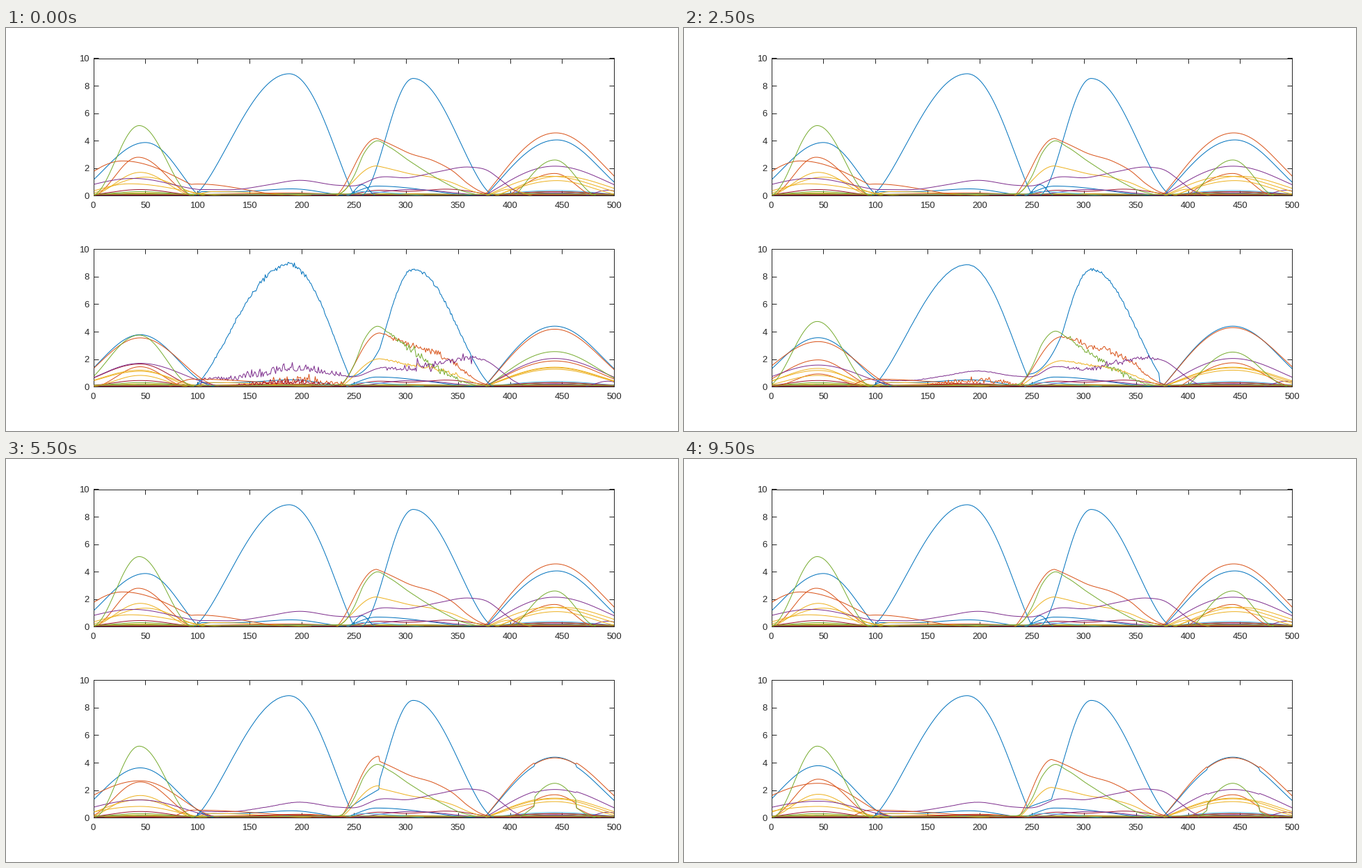
A matplotlib script that plays this animation: 966x580 px, repeating every 10000 ms.

```python
import numpy as np
import matplotlib.pyplot as plt
from matplotlib.animation import FuncAnimation

WIDTH, HEIGHT, DPI = 966, 580, 100
PX = 72 / DPI
FRAMES, INTERVAL = 20, 500
INK = "#262626"
BLUE, ORANGE, YELLOW, PURPLE, GREEN, CYAN, MAROON = COLORS = (
    "#0072bd", "#d95319", "#edb120", "#7e2f8e", "#77ac30", "#4dbeee", "#a2142f")
plt.rcParams["font.family"] = "Liberation Sans"

X = np.arange(1, 501.0)


def ease(t):
    t = np.clip(t, 0, 1)
    return t * t * (3 - 2 * t)


def pulse(value, center, width):
    return np.exp(-((value - center) / width) ** 2)


def bell(center, height, left, right, left_power=2.0, right_power=2.0):
    """Lopsided cosine hump, zero beyond its half-widths."""
    d = X - center
    u = np.clip(np.abs(d) / np.where(d < 0, left, right), 0, 1)
    return height * np.cos(u * np.pi / 2) ** np.where(d < 0, left_power, right_power)


def late_bell(height, right=90, left=68, center=443):
    return bell(center, height, left, right, 1.1)


def through(*points):
    """Cubic Hermite curve through the points, zero outside them."""
    xs, ys = np.array(points, float).T
    m = np.gradient(ys, xs)
    i = np.clip(np.searchsorted(xs, X, "right") - 1, 0, len(xs) - 2)
    h = xs[i + 1] - xs[i]
    t = (X - xs[i]) / h
    y = (ys[i] + (ys[i + 1] - ys[i]) * ease(t)
         + t * (1 - t) * h * ((1 - t) * m[i] - t * m[i + 1]))
    return np.where((X < xs[0]) | (X > xs[-1]), 0, y)


def noise(frame, seed, start, end, level):
    """Jitter that fades in and out over a span."""
    span = np.clip((X - start) / (end - start), 0, 1)
    rng = np.random.default_rng(100 * seed + frame)
    return level * np.sin(np.pi * span) ** 0.6 * rng.normal(size=X.size)


FIRST_PEAK = bell(188, 8.87, 92, 63, 1.4, 1.2)
SECOND_PEAK = bell(307, 8.53, 50, 78, 1.8, 1.6)
ORANGE_FALL = through((262, 4.35), (272, 4.17), (285, 3.75), (303, 3.1), (328, 2.5),
                      (345, 1.8), (360, .85), (372, .3), (380, .12))
GREEN_HUMP = through((230, .1), (240, .3), (250, 1.4), (260, 3.1), (271, 3.97), (284, 3.55),
                     (303, 2.55), (335, 1.05), (352, .4), (367, .1))
PURPLE_WAVE = through((104, .45), (140, .47), (165, .75), (197, 1.12), (235, .76), (253, .75),
                      (273, 1.32), (303, 1.32), (330, 1.73), (362, 2.08), (378, 1.85),
                      (392, 1.1), (403, .45), (412, .1))


def small_curves():
    rng = np.random.default_rng(7)
    curves = []
    for i in range(14):
        a, b, c, d = rng.uniform(0, 1, 4) ** 2
        curves.append((COLORS[i % 7], 0.04 + 0.06 * a + bell(45, 0.2 * a, 50, 55)
                       + bell(190, 0.08 * b, 80, 60) + bell(290, 0.15 * c, 45, 80)
                       + bell(443, 0.2 * d, 60, 55)))
    return curves + [
        (MAROON, bell(45, .45, 62, 62)),
        (CYAN, late_bell(.38)),
        (MAROON, late_bell(.3)),
        (BLUE, .3 * bell(105, 1, 10, 70) + bell(190, .5, 80, 60)),
        (YELLOW, bell(115, .3, 25, 110)),
        (ORANGE, .1 + bell(190, .1, 90, 60)),
        (BLUE, bell(272, .7, 36, 105)),
        (MAROON, bell(275, .4, 40, 60) + bell(338, .48, 50, 60)),
        (PURPLE, bell(305, .45, 65, 80)),
        (CYAN, bell(258, .3, 18, 70)),
        (PURPLE, bell(494, .4, 25, 25)),
    ]


SMALL = small_curves()


def still_scene():
    orange_left = np.maximum(bell(28, 2.53, 75, 98, 2, 1.6), bell(100, .85, 60, 95))
    orange_mid = np.where(X < 272, bell(272, 4.17, 40, 40, 1.6), ORANGE_FALL)
    return SMALL + [
        (BLUE, bell(50, 3.87, 79, 52, 2, 1.3)),
        (BLUE, FIRST_PEAK),
        (BLUE, bell(258, .8, 14, 14)),
        (BLUE, SECOND_PEAK),
        (BLUE, late_bell(4.06, 82, 69, 445)),
        (ORANGE, orange_left),
        (ORANGE, orange_mid),
        (ORANGE, late_bell(4.57, 90, 69, 444)),
        (ORANGE, bell(43, 2.8, 45, 56)),
        (ORANGE, late_bell(1.62, 40, 45)),
        (YELLOW, bell(45, 1.7, 50, 54)),
        (YELLOW, bell(50, 1.35, 66, 62)),
        (YELLOW, bell(35, .87, 62, 95)),
        (YELLOW, .52 * orange_mid),
        (YELLOW, late_bell(1.42, 90, 62, 438)),
        (YELLOW, late_bell(1.42, 88, 62, 449)),
        (YELLOW, late_bell(1.1, 70, 60, 445)),
        (YELLOW, bell(399, .47, 25, 25)),
        (PURPLE, np.where(X < 104, .4 + bell(38, .86, 75, 75), PURPLE_WAVE)),
        (PURPLE, late_bell(2.15, 98)),
        (GREEN, bell(44, 5.1, 46, 53)),
        (GREEN, GREEN_HUMP),
        (GREEN, late_bell(2.6, 42, 38)),
        (GREEN, .1 + .03 * np.sin(X / 30)),
        (ORANGE, .03 + 0 * X),
    ]


def left_curves(quick, slow):
    def mix(a, b):
        return a + (b - a) * slow

    wide_color = MAROON if slow < .15 else ORANGE
    yield BLUE, bell(45, 3.78 - .3 * np.sin(np.pi * slow), 76, 74)
    yield ORANGE, bell(45, mix(3.55, 2.5), mix(77, 110), 80)
    yield wide_color, bell(45, mix(1.65, 2.8), mix(78, 48), 58)
    yield ORANGE, bell(45, 1.45 * (1 - slow) ** 1.5, 46, 46)
    yield YELLOW, bell(45, mix(1.2, 1.7), mix(78, 50), 56)
    yield YELLOW, bell(45, mix(1.12, 1.35), mix(78, 70), 64)
    yield YELLOW, bell(45, .82, mix(50, 100), mix(50, 75))
    yield PURPLE, bell(45, mix(1.7, 1.2), mix(78, 107), 85)
    yield GREEN, bell(44, 3.75 + 1.45 * quick, 62 - 18 * quick, 54)


def right_curves(frame, quick):
    # beyond half of the span around the hump the tracks swap levels
    half = 16.5 + 8 * ease((frame - 7) / 9)
    outside = np.abs(X - 443.5) > half
    amount = ease((frame - 5) / 4)

    def stepped(curve, factor):
        return curve * np.where(outside, 1 + (factor - 1) * amount, 1)

    yield BLUE, stepped(late_bell(4.4), .96)
    yield ORANGE, stepped(late_bell(4.18 + .17 * quick, 90 + 6 * quick), 1.03)
    yield ORANGE, stepped(late_bell(1.87 - .2 * quick, 90 - 42 * quick, 68 - 24 * quick), .7)
    yield YELLOW, stepped(late_bell(1.42), 1.03)
    yield YELLOW, late_bell(1.37, 90 - 8 * quick)
    yield YELLOW, late_bell(1.27 - .1 * quick, 90 - 14 * quick)
    yield PURPLE, stepped(late_bell(2.05, 94), 1.04)
    yield GREEN, stepped(late_bell(2.55 - .05 * quick, 85 - 43 * quick, 66 - 32 * quick), .56)


def middle_curves(frame, quick):
    settled = ease((frame - 7) / 4)
    unsettled = max(0, 1 - (frame / 9) ** 3)
    decay = np.exp((11 - frame) / 4)
    kink = 275 + .85 * frame if frame < 8 else 269 + 5 * decay
    start = 1 / (1 + frame) ** 1.5

    # the blue track leaves the first peak and joins the second at the kink
    low = .75 + .45 * pulse(frame, 7, 2)
    top = np.interp(kink, X, SECOND_PEAK)
    top += (1.25 + .8 * decay - top) * settled
    u = np.clip((X - 247) / (kink - 247), 0, 1)
    rise = low + (top - low) * u ** (2 - 1.1 * settled)
    lost = (X > 365 + 1.4 * frame) & (frame < 8)
    second = SECOND_PEAK * np.where(lost, 1 - .13 * frame, 1)
    blue = np.where(X < 247, FIRST_PEAK, np.where(X <= kink, rise, second))
    yield BLUE, (blue + noise(frame, 1, 105, 240, .09 * start)
                 + noise(frame, 2, 282, 370, .07 * unsettled))

    dent = .5 * pulse(frame, 3, 3)
    fall = ORANGE_FALL - dent * np.exp(-np.abs(X - kink) / 15)
    tip = np.interp(kink, X, fall) + .35 * min(decay, 1) ** 1.5 * settled
    u = np.clip((X - 236) / (kink - 236), 0, 1)
    orange = np.where(X <= kink, tip * np.sin(u * np.pi / 2) ** 1.5, fall)
    yield ORANGE, orange + noise(frame, 3, 278, 365, .17 * unsettled)
    yield YELLOW, .52 * orange + noise(frame, 4, 278, 365, .07 * unsettled)
    yield GREEN, GREEN_HUMP * (1.1 - .13 * quick) + noise(frame, 5, 280, 360, .16 * unsettled)

    overshoot = .55 * pulse(X, 267, 10) * pulse(frame, 6.5, 1.5)
    yield PURPLE, (PURPLE_WAVE + overshoot
                   + np.abs(noise(frame, 6, 100, 245, .35 * start))
                   + noise(frame, 7, 275, 378, .11 * unsettled + .1 * start))

    yield ORANGE, bell(95, .55, 25, 150)
    yield ORANGE, bell(200, .25, 90, 60) + np.abs(noise(frame, 8, 150, 248, .25 * unsettled))
    yield MAROON, bell(195, .2, 90, 55) + np.abs(noise(frame, 9, 130, 240, .15 * start))


def moving_scene(frame):
    quick, slow = ease(frame / 8), ease(frame / 15)
    return [*SMALL, *left_curves(quick, slow), *right_curves(frame, quick),
            *middle_curves(frame, quick),
            (GREEN, .1 + .03 * np.sin(X / 30)), (YELLOW, .03 + 0 * X)]


def visible(y):
    return np.where(y > .015, y, np.nan)


def make_axes(bottom):
    ax = fig.add_axes([.13, bottom, .775, .3412])
    ax.set(xlim=(0, 500), ylim=(0, 10), xticks=range(0, 501, 50), yticks=range(0, 11, 2))
    ax.tick_params(direction="in", top=True, right=True, length=7 * PX, width=PX,
                   color=INK, labelcolor=INK, labelsize=13 * PX)
    ax.tick_params(axis="x", pad=8.5 * PX)
    ax.tick_params(axis="y", pad=6 * PX)
    for spine in ax.spines.values():
        spine.set(color=INK, linewidth=PX, zorder=1)
    return ax


def add_lines(ax, scene):
    return [ax.plot(X, visible(y), color=color, lw=PX)[0] for color, y in scene]


fig = plt.figure(figsize=(WIDTH / DPI, HEIGHT / DPI), dpi=DPI, facecolor="white")
add_lines(make_axes(.5838), still_scene())
lines = add_lines(make_axes(.11), moving_scene(0))


def update(frame):
    for line, (color, y) in zip(lines, moving_scene(frame)):
        line.set_ydata(visible(y))
        line.set_color(color)
    return lines


animation = FuncAnimation(fig, update, frames=FRAMES, interval=INTERVAL,
                          repeat=True, repeat_delay=0)
plt.show()
```
